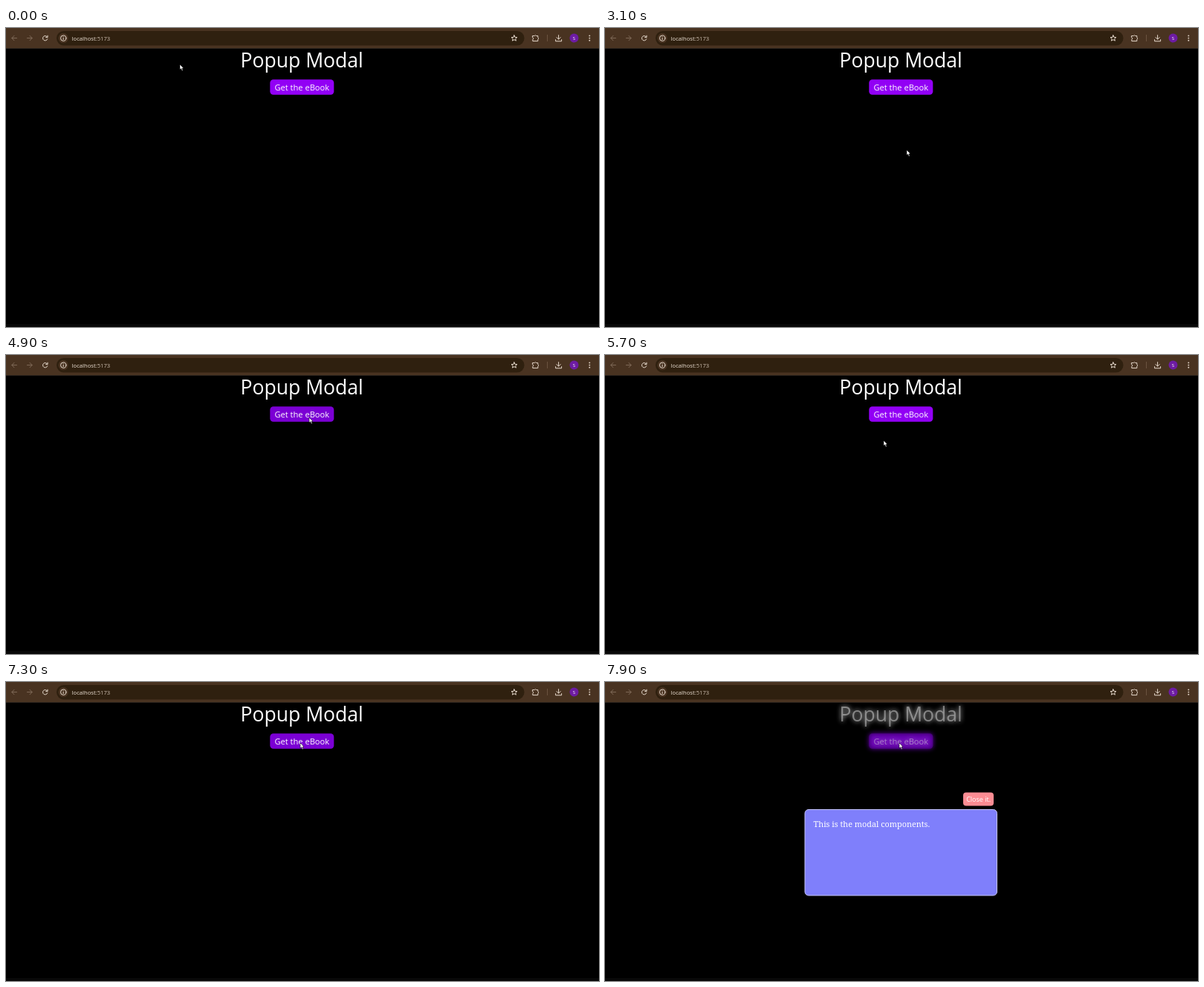
Animation, 798 px wide and 402 px high, one loop 8000 ms. Source, as an HTML page:

```html
<!DOCTYPE html>
<html lang="en">
<head>
<meta charset="utf-8">
<title>Popup Modal</title>
<style>
  html, body { margin: 0; width: 100%; height: 100%; overflow: hidden; background: #000; }
  svg { display: block; width: 798px; height: 402px; }
  text { font-family: "Open Sans", "Noto Sans", sans-serif; fill: #fff; }
  .mid { text-anchor: middle; }
  .icon { fill: none; stroke: #e6d9cc; stroke-linecap: round; stroke-linejoin: round; }
  .dim { stroke: #806b59; }
  .solid { fill: #e6d9cc; }
  #btn { fill: #9200f5; }
  .hover #btn { fill: #7b00d4; }
  #blur, #modal { visibility: hidden; }
  #blur { filter: blur(3px); opacity: .75; }
  .open #blur, .open #modal { visibility: visible; }
  .open #page { opacity: .4; }
  #modal .body { font-family: "Noto Serif", "Liberation Serif", serif; font-size: 10.85px; }
</style>
</head>
<body>
<svg id="stage" viewBox="0 0 798 402">
  <rect width="798" height="402" fill="#000"/>
  <rect y="398" width="798" height="4" fill="#080808"/>

  <use id="blur" href="#content"/>
  <g id="page">
    <g id="content">
      <text class="mid" x="398.2" y="53" font-size="26.5">Popup Modal</text>
      <rect id="btn" x="355.3" y="69.2" width="86" height="20.6" rx="4.5"/>
      <text class="mid" x="398.3" y="83.6" font-size="11.1">Get the eBook</text>
    </g>
  </g>

  <g id="modal">
    <rect x="482" y="148.5" width="41" height="18" rx="4" fill="#fb8c93"/>
    <text class="mid" x="502.6" y="160.8" font-size="9">Close it.</text>
    <rect x="269" y="171.5" width="258.5" height="115.5" rx="5" fill="#7f7ffb" stroke="#c3c3fb"/>
    <text class="body" x="280.6" y="194.8">This is the modal components.</text>
  </g>

  <g id="toolbar">
    <rect width="798" height="27" fill="#493321"/>
    <rect y="27" width="798" height="1" fill="#2a221c"/>
    <rect x="68" y="4" width="629.5" height="19.5" rx="9.75" fill="#2f200f"/>
    <path class="icon dim" d="M14.5 13.6H8M11 10.4 7.8 13.6 11 16.8M28.5 13.6H35M32 10.4 35.2 13.6 32 16.8"/>
    <path class="icon" d="M55.6 12.2A3.2 3.2 0 1 0 55.8 14.8M56 10.2V12.6H53.6"/>
    <circle cx="77.2" cy="13.7" r="6.6" fill="#493321"/>
    <circle class="icon" cx="77.2" cy="13.7" r="3.7"/>
    <path class="icon" d="M77.2 13.6V15.5M77.2 11.9V11.95"/>
    <text x="88.6" y="16.7" font-size="7.65" style="fill:#eee2d6">localhost<tspan fill="#cbbcae">:5173</tspan></text>
    <path class="icon" d="M683.9 9.8 685 12.4 687.8 12.6 685.7 14.4 686.3 17.2 683.9 15.7 681.5 17.2 682.1 14.4 680 12.6 682.8 12.4Z"/>
    <path class="icon" d="M708.8 10.6H711.2A1.3 1.3 0 0 1 713.6 10.6H715.8V12.8A1.3 1.3 0 0 1 715.8 15.2V17.6H708.8V15.4A1.4 1.4 0 0 0 708.8 12.8Z"/>
    <path d="M728.5 9V18" stroke="#6b5340"/>
    <path class="icon" d="M743.6 9.6V15M741 12.6 743.6 15.2 746.2 12.6M739.6 15.6V17.8H747.6V15.6"/>
    <circle cx="764.5" cy="13.6" r="6" fill="#6d1ba3"/>
    <text class="mid" x="764.5" y="15.8" font-size="6">S</text>
    <g class="solid">
      <circle cx="785.3" cy="10.4" r=".95"/>
      <circle cx="785.3" cy="13.6" r=".95"/>
      <circle cx="785.3" cy="16.8" r=".95"/>
    </g>
  </g>

  <path id="cursor" fill="#fff" stroke="#000" stroke-width=".5" d="M0 0V7L1.6 5.6 2.9 8.4 4.1 7.9 2.9 5.2 5 5Z"/>
</svg>
<script>
  const LOOP = 8000, TICK = 100, OPEN_AT = 7500;

  // Pointer moves; it rests between them
  const home = { x: 234, y: 49 };
  const moves = [
    { from: 0, to: 200, x: 385, y: 156 },
    { from: 300, to: 1300, x: 406, y: 164 },
    { from: 3100, to: 3900, x: 481, y: 157 },
    { from: 4100, to: 4200, x: 447, y: 170 },
    { from: 4300, to: 4500, x: 408, y: 84 },
    { from: 5100, to: 5200, x: 467, y: 123 },
    { from: 5300, to: 5500, x: 375, y: 115 },
    { from: 5700, to: 6300, x: 396, y: 82 }
  ];

  const stage = document.getElementById("stage");
  const cursor = document.getElementById("cursor");
  const clamp = k => Math.max(0, Math.min(1, k));
  const ease = k => k * k * (3 - 2 * k);

  function pointerAt(t) {
    return moves.reduce((p, m) => {
      const k = ease(clamp((t - m.from) / (m.to - m.from)));
      return { x: p.x + (m.x - p.x) * k, y: p.y + (m.y - p.y) * k };
    }, home);
  }

  function draw(now) {
    const t = Math.floor((now % LOOP) / TICK) * TICK;
    const { x, y } = pointerAt(t);
    cursor.setAttribute("transform", `translate(${x} ${y})`);
    stage.classList.toggle("hover", x > 355 && x < 441 && y > 69 && y < 90);
    stage.classList.toggle("open", t >= OPEN_AT);
  }

  const start = performance.now();
  function loop() {
    draw(performance.now() - start);
    requestAnimationFrame(loop);
  }
  loop();
</script>
</body>
</html>
```
